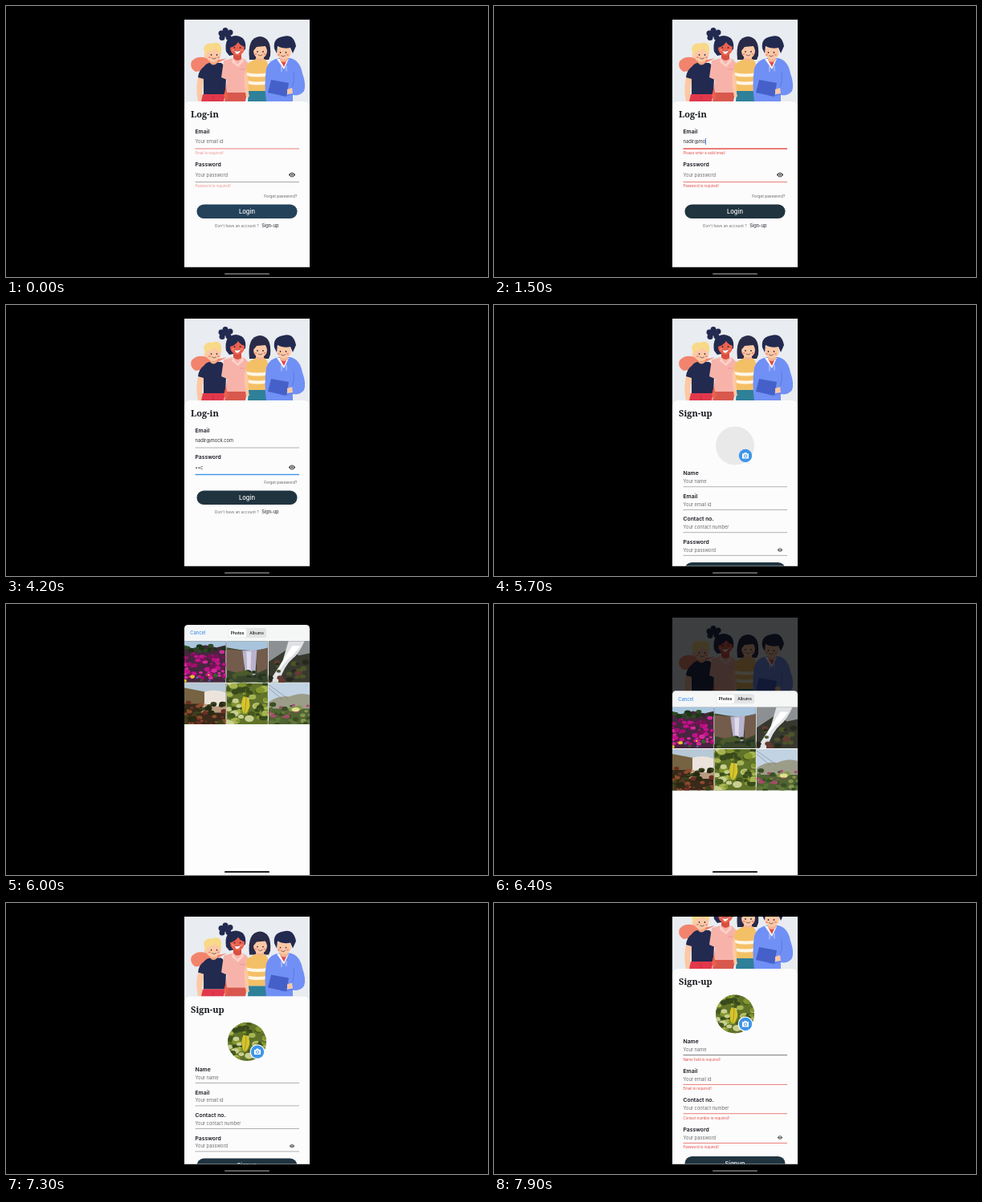
Recreate the animation shown at these times as an HTML page. Size 600x338 px, loop 8 s.

```html
<!DOCTYPE html>
<html lang="en">
<head>
<meta charset="utf-8">
<title>Log-in and sign-up</title>
<style>
  html, body { margin: 0; width: 100%; height: 100%; overflow: hidden; background: #000; }
  svg { display: block; width: 600px; height: 338px; }
  text { font-family: Inter, Roboto, sans-serif; }
  .serif { font-family: "Noto Serif", serif; }
</style>
</head>
<body>
<svg viewBox="0 0 600 338">
  <defs id="defs"></defs>
  <g id="ui"></g>
</svg>
<script>
const LOOP = 8000;
const EMAIL = 'nadir@mock.com', SECRET = 'abcdef';
const RED = '#e5473f', BLUE = '#3f96e8', DARK = '#203440', INK = '#16181d';

const clamp = v => Math.max(0, Math.min(1, v));
const ramp = (t, a, b) => clamp((t - a) / (b - a));
const ease = p => p * p * (3 - 2 * p);

const path = (fill, d) => `<path fill="${fill}" d="${d}"/>`;
const line = (d, color = '#28233f', w = .6) =>
  `<path d="${d}" fill="none" stroke="${color}" stroke-width="${w}" stroke-linecap="round"/>`;
const rect = (x, y, w, h, fill, extra = '') =>
  `<rect x="${x}" y="${y}" width="${w}" height="${h}" fill="${fill}" ${extra}/>`;
const oval = (x, y, rx, ry, fill) =>
  `<ellipse cx="${x}" cy="${y}" rx="${rx}" ry="${ry}" fill="${fill}"/>`;
const text = (s, x, y, size, fill, weight = 400, extra = '') =>
  `<text x="${x}" y="${y + size * .36}" font-size="${size}" font-weight="${weight}" fill="${fill}" ${extra}>${s}</text>`;
const MID = 'text-anchor="middle"', END = 'text-anchor="end"';

const pen = document.createElement('canvas').getContext('2d');
function widthOf(s, size) {
  pen.font = '100px Inter, Roboto, sans-serif';
  return pen.measureText(s).width * size / 100;
}

// ---- group illustration ----
const face = (x, y) =>
  oval(x - 3.5, y, .8, .9, '#28233f') + oval(x + 3.5, y, .8, .9, '#28233f') +
  line(`M${x - 2.5} ${y + 4}q2.5 2.4 5 0`) +
  oval(x - 5.5, y + 3, 1.5, 1, '#f28b78') + oval(x + 5.5, y + 3, 1.5, 1, '#f28b78');

function hero() {
  const navy = '#222a50', skin = '#fcc8a5';
  const bun = [[268, 34], [273, 30.5], [279, 33], [269, 39.5], [277, 39], [273, 35]]
    .map(([x, y]) => oval(x, y, 3.5, 3.5, navy)).join('');
  return rect(222, 17, 156, 112, '#e9ecf0') +
    path('#f2846d', 'M275 65Q262 69 250 65Q238 61 231 69Q228 77 236 82L248 80L258 74Z') +
    // boy with blond hair
    path(skin, 'M240 86Q235 102 239 119L245 119Q243 102 248 88Z') +
    path(navy, 'M246 76Q250 70 258 71L268 71Q275 76 274 90L273 110L246 110L246 91L239 89Q240 80 246 76Z') +
    path('#e1384b', 'M245 110H273L271 119H243Z') +
    line('M258 112V119', '#b82a3e') +
    path('#f2a984', 'M254 66H263V71Q258 76 254 71Z') +
    oval(258, 60, 9.5, 10, skin) + oval(248.5, 62, 1.8, 2.4, skin) +
    path('#f8d987', 'M248 61L246 53Q249 45 256 47Q265 43 268 51L268 59Q263 57 260 53Q254 58 250 57L250 61Z') +
    face(259, 61) +
    // girl with a bun
    bun + path(navy, 'M274 57Q271 38 286 37Q300 38 298 54L288 60L278 62Z') +
    path('#d84f40', 'M283 60H293V69Q288 73 283 68Z') +
    oval(288, 52, 9, 10, '#ea614d') +
    path(navy, 'M278 52Q278 40 288 41Q298 42 298 51Q292 50 289 45Q285 51 278 52Z') +
    face(288, 52) + path('#fff', 'M284.5 56Q289 57.5 292 55.5Q290 60.5 286.5 59.5Z') +
    path('#f7b3aa', 'M271 68L283 65Q288 71 294 65Q303 68 303 80L300 108L274 108L275 92L268 89Z') +
    path('#fbd2ca', 'M282 65L288 73L295 65L296 69L289 76L281 70Z') +
    line('M291 79H297', '#e2877f') +
    path('#d9584d', 'M274 108H300L298 119H272Z') +
    path('#ea614d', 'M275 96Q273 105 277 113L274 118L271 112Z') +
    // girl with a bob
    path('#292b48', 'M303 67Q300 39 316 38Q331 39 329 62L327 67L306 67Z') +
    path('#f3b592', 'M311 62H321V69Q316 73 311 69Z') +
    oval(316.5, 56, 8.5, 9.5, skin) +
    path('#292b48', 'M307 57Q305 44 316 43Q327 44 326 56L323 50L312 51Z') +
    face(316.5, 57) +
    path('#f4c066', 'M300 72L311 66Q316 71 322 66Q329 72 326 90L325 106L302 106Q297 86 300 72Z') +
    path('#fff6e6', 'M299.5 83Q313 86 327 83V87Q313 90 300 87ZM300.5 93Q313 96 326 93V97Q313 100 301 97Z') +
    path('#2f8099', 'M302 106H325L324 119H301Z') +
    path(skin, 'M299 80L302 94Q301 106 303 113L299 114Q296 98 297 84Z') +
    // boy in a hoodie
    path('#7190f5', 'M324 78Q328 66 341 65L354 65Q366 68 369 84Q374 98 371 106Q366 113 357 111V119H324Q321 98 324 78Z') +
    path('#fff', 'M337 66L346 79L352 66Z') + path('#e1484b', 'M341 67L346 76L350 67Z') +
    path('#f3b592', 'M341 62H351V68Q346 72 341 68Z') +
    oval(346, 57, 9, 9.5, skin) +
    path(navy, 'M334 53Q332 40 345 38Q358 34 361 50L357 59L354 52Q345 54 338 50L337 59Z') +
    face(345, 58) +
    line('M358 83Q360 95 355 103M357 110Q350 113 342 112', '#4d69d2') +
    path('#4561c9', 'M330 92L352 96L349 113L326 108Z') +
    path(skin, 'M350 104L356 102L357 109L350 110Z') +
    line('M343 75V82M349 75V81', '#fff');
}

// ---- gallery pictures, each 52 by 52 ----
function blobs(seed, n, colors, y0, y1, size) {
  let out = '';
  const rnd = () => (seed = seed * 16807 % 2147483647) / 2147483647;
  for (let i = 0; i < n; i++) {
    const x = rnd() * 52, y = y0 + rnd() * (y1 - y0), r = size * (.5 + rnd());
    out += oval(x.toFixed(1), y.toFixed(1), r.toFixed(1), (r * .7).toFixed(1), colors[i % colors.length]);
  }
  return out;
}
const pictures = [
  rect(0, 0, 52, 52, '#47263f') + path('#a9c6dd', 'M0 0H52V5L40 8L26 5L10 9L0 6Z') +
    blobs(71, 20, ['#2c4a22', '#1c3417'], 5, 13, 3) +
    blobs(13, 75, ['#c4128a', '#a60d72', '#d62a9c', '#7b1058'], 13, 46, 2.6) +
    blobs(37, 10, ['#e8c52d', '#35602a', '#4c66b8'], 40, 51, 2),
  rect(0, 0, 52, 52, '#39442c') + path('#a8c4dd', 'M0 0H52V9L34 12L18 11L0 8Z') +
    path('#735c4c', 'M0 10L22 12V42L0 36ZM37 12L52 8V34L38 40Z') +
    path('#b9b3cd', 'M20 12L38 11L36 42L24 44Z') + path('#dedbea', 'M25 13H31L30 42H26Z') +
    blobs(53, 25, ['#263520', '#4c5a2c', '#35462a'], 38, 52, 4),
  rect(0, 0, 52, 52, '#37392f') + path('#8d9093', 'M0 0H52V15L38 18L24 10L0 26Z') +
    path('#dfe1e4', 'M25 0H45Q38 16 30 22Q20 30 13 52H0Q12 34 18 24Z') +
    path('#fff', 'M30 6H40Q32 17 24 23Q14 33 8 47Q14 28 30 6Z') +
    blobs(91, 25, ['#24291c', '#4c5428', '#643b32'], 24, 52, 3),
  rect(0, 0, 52, 52, '#392a1a') + path('#b7c9d6', 'M0 0H52V12H0Z') + path('#756342', 'M0 6L26 11V26H0Z') +
    path('#ece4dc', 'M25 11Q38 7 52 12V28Q38 36 25 26Z') +
    path('#b99b80', 'M24 25Q38 33 52 26V37H20Z') +
    blobs(29, 50, ['#6f2e22', '#3b421c', '#8c4c2d', '#272a13'], 24, 52, 3),
  rect(0, 0, 52, 52, '#607329') +
    blobs(47, 65, ['#82962f', '#46591d', '#a6b550', '#384a1c', '#c9cf91'], 0, 52, 4) +
    path('#d7c42c', 'M21 17Q30 17 29 29Q27 37 22 39Q16 28 21 17Z') + line('M24 8Q26 25 22 39', '#83801f'),
  rect(0, 0, 52, 52, '#506332') + path('#c2d3e3', 'M0 0H52V24H0Z') +
    path('#9c9d88', 'M0 24Q12 15 26 17Q40 11 52 15V32H0Z') +
    line('M0 6L17 20M0 2L24 19', '#6c737a', .5) +
    blobs(83, 50, ['#5d7737', '#394f24', '#86954f', '#a84a6d'], 26, 52, 2.8) + oval(34, 33, 5, 2.6, '#dfe28a')
];

document.getElementById('defs').innerHTML =
  '<clipPath id="screen"><rect x="222" y="17" width="156" height="308.5"/></clipPath>' +
  '<clipPath id="round"><circle cx="300" cy="175.5" r="24"/></clipPath>' +
  '<clipPath id="tile"><rect width="51.5" height="51.5"/></clipPath>' +
  `<g id="hero">${hero()}</g>` +
  pictures.map((p, i) => `<g id="pic${i}" clip-path="url(#tile)">${p}</g>`).join('');

// ---- interface parts ----
const page = title =>
  rect(222, 17, 156, 400, '#fcfcfd') + '<use href="#hero"/>' +
  rect(222, 119, 156, 300, '#fcfcfd', 'rx="7"') +
  text(title, 230, 135, 11, INK, 700, 'class="serif"');

const eye = (y, k) =>
  `<g transform="translate(356 ${y}) scale(${k})"><path fill="#4a4a4c" d="M-4.3 0Q0-5.8 4.3 0Q0 5.8-4.3 0Z"/>` +
  '<circle r="1.9" fill="#fff"/><circle r="1.15" fill="#4a4a4c"/></g>';

const button = (label, y, fill = DARK) =>
  rect(237.5, y, 125, 17.5, fill, 'rx="8.75"') + text(label, 300, y + 8.8, 7.5, '#fff', 500, MID);

// dy holds the offsets of input, underline and message below the label
function field(y, label, hint, dy, { value = '', err = '', fade = 1, focus, color, caret } = {}) {
  const stroke = color || (err ? RED : focus ? BLUE : '#929296');
  const iy = y + dy[0], w = focus ? 1.4 : .7;
  return text(label, 235.5, y, 6.8, INK, 600) +
    text(value || hint, 235.5, iy, 5.75, value ? '#303034' : '#6d6d70') +
    (caret ? rect(235.3 + widthOf(value, 5.75), iy - 4, .8, 8, '#3267d6') : '') +
    rect(235.5, y + dy[1] - w / 2, 129.5, w, stroke) +
    (err ? text(err, 235.5, y + dy[2], 4.35, RED, 400, `opacity="${fade}"`) : '');
}

const LOGIN = [12.5, 21.5, 26.8], SIGNUP = [10, 16.8, 22];

function login(t) {
  const typed = EMAIL.slice(0, Math.max(0, Math.floor((t - 900) / 80) + 1));
  const count = Math.max(0, Math.min(SECRET.length, Math.floor((t - 3500) / 300) + 1));
  const fresh = count && t - 3500 - (count - 1) * 300 < 250;
  const secret = '•'.repeat(fresh ? count - 1 : count) + (fresh ? SECRET[count - 1] : '');
  const fade = .6 + .4 * ramp(t, 0, 250);
  const emailErr = !typed ? 'Email is required!' : typed === EMAIL ? '' : 'Please enter a valid email';
  const onEmail = t >= 500 && t < 2800, onSecret = t >= 2800 && t < 5250;
  const y = emailErr ? 198 : 190, low = y + (count ? 31 : 39);
  const blink = t % 1000 < 600;
  return page('Log-in') +
    field(156.5, 'Email', 'Your email id', LOGIN,
      { value: typed, err: emailErr, fade, focus: onEmail, caret: onEmail && blink }) +
    field(y, 'Password', 'Your password', LOGIN,
      { value: secret, err: count ? '' : 'Password is required!', fade, focus: onSecret,
        color: t < 150 ? '#858589' : '', caret: onSecret && !count && blink }) +
    eye(y + 12.5, 1) +
    text('Forget password?', 362.5, low, 4.85, '#77777b', 500, END) +
    button('Login', low + 10.5, t < 300 ? '#24425a' : DARK) +
    text("Don't have an account ?", 260, low + 37.5, 4.75, '#808084', 500) +
    text('Sign-up', 318.3, low + 37.5, 5.5, '#55565c', 600);
}

function signup(t) {
  const failed = t >= 7700, photo = t >= 6900;
  const scroll = 37 * ease(ramp(t, 7250, 7580));
  const rows = [['Name', 'Your name', 'Name field'], ['Email', 'Your email id', 'Email'],
    ['Contact no.', 'Your contact number', 'Contact number'], ['Password', 'Your password', 'Password']];
  const pitch = failed ? 36.5 : 28.5;
  const fields = rows.map(([label, hint, name], i) =>
    field(210 + i * pitch, label, hint, SIGNUP,
      { err: failed ? name + ' is required!' : '', color: failed && !i ? '#3c3c42' : '' })).join('');
  return `<g transform="translate(0 ${-scroll})">` + page('Sign-up') +
    oval(300, 175.5, 24, 24, '#e9e9ea') +
    (photo ? '<g clip-path="url(#round)"><use href="#pic4" transform="translate(275.5 151) scale(.95)"/></g>' +
      oval(313, 188, 9.4, 9.4, '#fff') : '') +
    oval(313, 188, 8.2, 8.2, BLUE) +
    path('#fff', 'M309 185.3H311L312 184H314L315 185.3H317V191.5H309Z') +
    oval(313, 188.4, 2.1, 2.1, BLUE) + oval(313, 188.4, 1.2, 1.2, '#fff') +
    fields + eye(220 + 3 * pitch, .75) +
    button('Signup', 321 + (failed ? 32 : 0)) + '</g>';
}

function picker() {
  const tiles = pictures.map((_, i) =>
    `<use href="#pic${i}" x="${222 + i % 3 * 52.3}" y="${46.3 + Math.floor(i / 3) * 52.3}"/>`).join('');
  return rect(222, 26, 156, 30, '#f5f7f7', 'rx="4.5"') + rect(222, 46, 156, 300, '#fdfdfd') +
    text('Cancel', 229.3, 36.3, 5.8, '#2583ea') +
    rect(276.5, 30, 47.5, 12, '#e2e4e5', 'rx="2.5"') +
    rect(277.2, 30.6, 22, 10.8, '#fff', 'rx="2.2"') +
    text('Photos', 288, 36.1, 4.9, '#111', 600, MID) +
    text('Albums', 312, 36.1, 4.9, '#222', 500, MID) + tiles;
}

function draw(t) {
  const push = ease(ramp(t, 5420, 5620));
  const sheet = ease(ramp(t, 5700, 5980)) - ease(ramp(t, 6300, 6600));
  let out = '<g clip-path="url(#screen)">';
  if (push < 1) out += `<g transform="translate(${-45 * push} 0)">${login(t)}</g>`;
  if (push > 0) out += `<g transform="translate(${156 * (1 - push)} 0)">${signup(t)}</g>`;
  out += '</g>';
  if (sheet > 0) {
    out += rect(221, 16, 158, 311, '#000', `opacity="${sheet}"`) +
      `<g transform="translate(0 ${312 * (1 - sheet)})">${picker()}</g>`;
  }
  out += rect(272, 333.2, 56, 1.9, sheet > .1 ? '#000' : '#6b6b6b', 'rx=".95"');
  document.getElementById('ui').innerHTML = out;
}

const start = performance.now();
function tick() {
  draw((performance.now() - start) % LOOP);
  requestAnimationFrame(tick);
}
tick();
</script>
</body>
</html>
```
